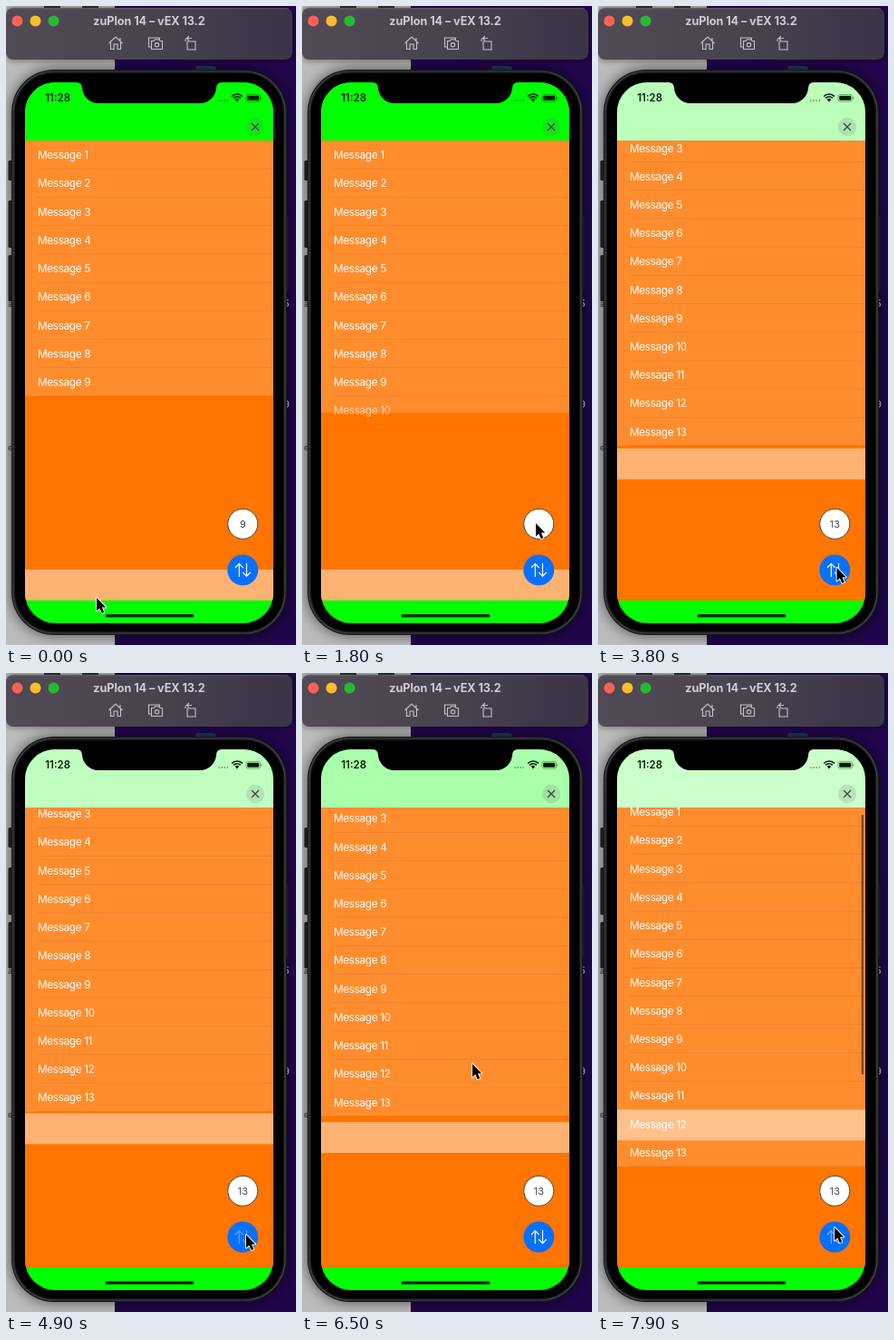
These frames come from a looping animation (320x703 px, 8 s). An HTML page with a canvas:

```html
<!DOCTYPE html>
<html lang="en">
<head>
<meta charset="utf-8">
<title>Message list</title>
<style>
html, body { margin: 0; width: 100%; height: 100%; overflow: hidden; background: #1c0546; }
canvas { display: block; width: 320px; height: 703px; }
</style>
</head>
<body>
<canvas id="stage"></canvas>
<script>
const W = 320, H = 703, LOOP = 8000;
const TOP = 148, ROW = 31.22, BAR_DOWN = 620, BAR_RISE = 126;
const MOVE = 600, MAX_SCROLL = 66.3;
const FONT = 'Inter, Roboto, sans-serif';
const canvas = document.getElementById('stage');
const g = canvas.getContext('2d');
const dpr = window.devicePixelRatio || 1;
canvas.width = W * dpr;
canvas.height = H * dpr;

// [time, open]
const toggles = [[290, 1], [1200, 0], [3400, 1], [4807, 0], [5905, 1], [7755, 0]];
const adds = [1700, 1970, 2240, 2510];
// [time, x, y]
const path = [
  [0, 100, 651], [290, 259, 623], [900, 261, 622], [1300, 261, 622], [1650, 258, 569],
  [2850, 258, 569], [3250, 263, 618], [4900, 265, 618], [5350, 254, 611], [6000, 254, 611],
  [6420, 188, 430], [6650, 188, 430], [7100, 190, 492], [7200, 190, 492], [7620, 261, 610], [8000, 261, 610]
];

const clamp = v => Math.max(0, Math.min(1, v));
const ease = v => { v = clamp(v); return v * v * (3 - 2 * v); };
const ramp = (t, a, b) => ease((t - a) / (b - a));
const last = (list, t) => list.filter(v => v <= t).pop() ?? -9999;

function box(x, y, w, h, color, r = 0) {
  g.fillStyle = color;
  g.beginPath();
  g.roundRect(x, y, w, h, r);
  g.fill();
}
function disc(x, y, r, color) {
  g.fillStyle = color;
  g.beginPath();
  g.arc(x, y, r, 0, Math.PI * 2);
  g.fill();
}
function stroke(d, color, width) {
  g.strokeStyle = color;
  g.lineWidth = width;
  g.stroke(new Path2D(d));
}
function text(s, x, y, size, color, weight = 400, align = 'left', gap = 0) {
  g.font = `${weight} ${size}px ${FONT}`;
  g.textAlign = align;
  g.textBaseline = 'alphabetic';
  g.letterSpacing = gap + 'px';
  g.fillStyle = color;
  g.fillText(s, x, y);
}
function gradient(x0, y0, x1, y1, ...colors) {
  const f = g.createLinearGradient(x0, y0, x1, y1);
  colors.forEach((c, i) => f.addColorStop(i / (colors.length - 1), c));
  return f;
}
function shadowed(blur, alpha, paint) {
  g.save();
  g.shadowColor = `rgba(0,0,0,${alpha})`;
  g.shadowBlur = blur * dpr;
  paint();
  g.restore();
}

// Pulls back before it moves and overshoots at the end.
function backInOut(v) {
  v = clamp(v) * 2;
  const c = 2.75, pull = u => u * u * ((c + 1) * u - c) / 2;
  return v < 1 ? pull(v) : 1 - pull(2 - v);
}

function stateAt(t) {
  let lift = 0, since = 9999;
  const current = toggles.filter(v => v[0] <= t).pop();
  if (current) {
    since = t - current[0];
    const k = backInOut(since / MOVE);
    lift = current[1] ? k : 1 - k;
  }
  const drag = (MAX_SCROLL - 3.700) * ramp(t, 6650, 7100);
  const scroll = t < 3000 ? 0 : Math.max(0, MAX_SCROLL * lift - drag);
  return {
    lift, scroll,
    rows: adds.reduce((n, a) => n + ramp(t, a, a + 180), 9),
    count: 9 + adds.filter(a => a <= t).length,
    head: (170 + 300 * Math.max(0, lift - 1)) * clamp(scroll / 3),
    thumb: ramp(t, 6640, 6740) * clamp(lift),
    arrows: 0.32 + 0.68 * ramp(since, 80, 320),
    digits: 0.04 + 0.96 * ramp(t - last(adds, t), 200, 380)
  };
}

function desktop() {
  box(0, 0, W, H, gradient(0, 0, 0, H, '#22064f', '#1f054b'));
  box(0, 0, 120, H, '#bcbcbc');
  box(209, 66, 23, 9, '#213762', 3);
  box(42, 0, 18, 3, '#333');
  box(84, 0, 18, 3, '#333');
  text('5', 306.5, 331, 10, '#bdb7c8', 600);
  text('9', 306.5, 442, 10, '#bdb7c8', 600);
  text('a', 2, 331, 9, '#333');
  text('e', 2, 489, 9, '#333');
}

function titleBar() {
  shadowed(9, 0.5, () => box(0, 2, 316, 57, gradient(0, 0, 316, 0, '#504b55', '#49434f', '#3b3346'), 8));
  box(4, 2.5, 308, 0.8, 'rgba(255,255,255,.2)');
  disc(12.5, 16.5, 6, '#ff6058');
  disc(32.5, 16.5, 6, '#ffbd2e');
  disc(52.5, 16.5, 6, '#28b835');
  text('zuPlon 14 – vEX 13.2', 158, 21, 12.7, '#d0cbd5', 700, 'center', -0.1);
  const ink = '#c4bfca';
  stroke('M113.5 41 L121 34 L128.5 41 M115.5 40 V47.5 H119 V42 H123 V47.5 H126.5 V40 M126 35 V38', ink, 1.1);
  stroke('M160 45 H157.5 V35 H169.5 V37 M160.5 38.5 H163 L164.5 36.8 H168.5 L170 38.5 H172.5 V47.5 H160.5 Z M168.7 42.8 A2.2 2.2 0 1 1 164.3 42.8 A2.2 2.2 0 1 1 168.7 42.8', ink, 1.1);
  stroke('M200 39 H209 V48 H200 Z M198 39 V37 Q198 35.5 200 35.5 H205 M202 33 L199.5 35.5 L202 38', ink, 1.1);
}

function phoneBody() {
  for (const [y, h] of [[170, 22], [214, 52], [274, 51]]) box(2.5, y, 5, h, '#25262a', 1.5);
  box(308, 231, 3.5, 82, '#252432', 1);
  shadowed(16, 0.6, () => box(6, 70, 304, 622, '#17181a', 47));
  g.strokeStyle = '#434448';
  g.lineWidth = 1.2;
  g.beginPath();
  g.roundRect(8, 72, 300, 618, 45);
  g.stroke();
  box(10, 74, 296, 614, '#000', 43);
}

function list(s) {
  g.save();
  g.beginPath();
  g.rect(21, TOP, 274, 506);
  g.clip();
  box(21, TOP, 274, 506, '#ff7500');
  const y0 = TOP - s.scroll;
  box(21, y0, 274, s.rows * ROW, '#ff8d2e');
  for (let i = 0; i < Math.ceil(s.rows); i++) {
    const y = y0 + i * ROW;
    g.globalAlpha = clamp(s.rows - i);
    text('Message ' + (i + 1), 35, y + 20.2, 11.8, '#fff', 400, 'left', -0.36);
    box(35, y + ROW - 0.4, 260, 0.7, 'rgba(125,75,45,.2)');
  }
  g.globalAlpha = 1;
  box(21, BAR_DOWN - BAR_RISE * s.lift, 274, 34, 'rgba(255,255,255,.45)');
  g.globalAlpha = s.thumb;
  box(290.7, 156 + (s.scroll - 11) * 0.8, 2.3, 286, 'rgba(65,35,10,.65)', 1.2);
  g.restore();
}

function statusBar() {
  box(84, 74, 148, 33, '#000', [0, 0, 18, 18]);
  g.fillStyle = '#000';
  g.fill(new Path2D('M78 84 Q84 84 84 91 V84 Z M238 84 Q232 84 232 91 V84 Z'));
  text('11:28', 43.3, 105.2, 11.4, '#062006', 600);
  for (let i = 0; i < 4; i++) disc(235 + i * 3.1, 104, 0.85, 'rgba(0,60,0,.6)');
  for (const r of [8, 5.3]) {
    g.beginPath();
    g.arc(255, 105, r, -Math.PI * 0.76, -Math.PI * 0.24);
    g.strokeStyle = '#062006';
    g.lineWidth = 1.6;
    g.stroke();
  }
  g.fillStyle = '#062006';
  g.fill(new Path2D('M255 105.5 L252.7 102.7 Q255 101 257.3 102.7 Z'));
  g.strokeStyle = 'rgba(0,50,0,.5)';
  g.lineWidth = 0.8;
  g.beginPath();
  g.roundRect(264.9, 97.4, 15.7, 7.7, 2.4);
  g.stroke();
  box(266.2, 98.7, 13.1, 5.1, '#062006', 1.3);
  box(281.4, 100, 1, 2.6, 'rgba(0,50,0,.5)', 0.5);
}

function controls(s) {
  disc(275, 133, 10.2, 'rgba(118,118,128,.2)');
  stroke('M271 129 L279 137 M279 129 L271 137', '#3b503c', 1.4);
  disc(261.3, 569.8, 16.5, '#fff');
  g.strokeStyle = '#484848';
  g.lineWidth = 1;
  g.stroke();
  g.globalAlpha = s.digits;
  text(s.count, 261.3, 573.7, 10.8, '#444', 400, 'center');
  g.globalAlpha = 1;
  disc(261.3, 620.5, 17, '#0870ff');
  g.globalAlpha = s.arrows;
  stroke('M257.3 628 V613.5 M253 618 L257.3 613.5 L261.5 618 M265.5 613 V627.5 M261.2 623 L265.5 627.5 L269.8 623', '#fff', 1.15);
  g.globalAlpha = 1;
}

function pointer(t) {
  let i = 0;
  while (i < path.length - 2 && path[i + 1][0] <= t) i++;
  const [a, x, y] = path[i], [b, x2, y2] = path[i + 1];
  const k = ramp(t, a, b);
  g.save();
  g.translate(x + (x2 - x) * k, y + (y2 - y) * k);
  const arrow = new Path2D('M0 0 V14.5 L3.3 11.5 L5.8 17 L8.3 15.9 L5.9 10.5 H10.2 Z');
  g.lineJoin = 'round';
  g.strokeStyle = '#fff';
  g.lineWidth = 1.8;
  g.stroke(arrow);
  g.fillStyle = '#000';
  g.fill(arrow);
  g.restore();
}

function draw(t) {
  const s = stateAt(t);
  g.setTransform(dpr, 0, 0, dpr, 0, 0);
  desktop();
  phoneBody();
  titleBar();
  g.save();
  g.beginPath();
  g.roundRect(21, 84, 274, 595, 33);
  g.clip();
  box(21, 84, 274, 595, '#0f0');
  const tone = Math.round(s.head);
  box(21, 84, 274, 64, `rgb(${tone},255,${tone})`);
  list(s);
  statusBar();
  controls(s);
  box(109.5, 669.3, 98, 3.3, '#041b04', 1.7);
  g.restore();
  pointer(t);
}

const start = performance.now();
function tick() {
  draw((performance.now() - start) % LOOP);
  requestAnimationFrame(tick);
}
tick();
</script>
</body>
</html>
```
